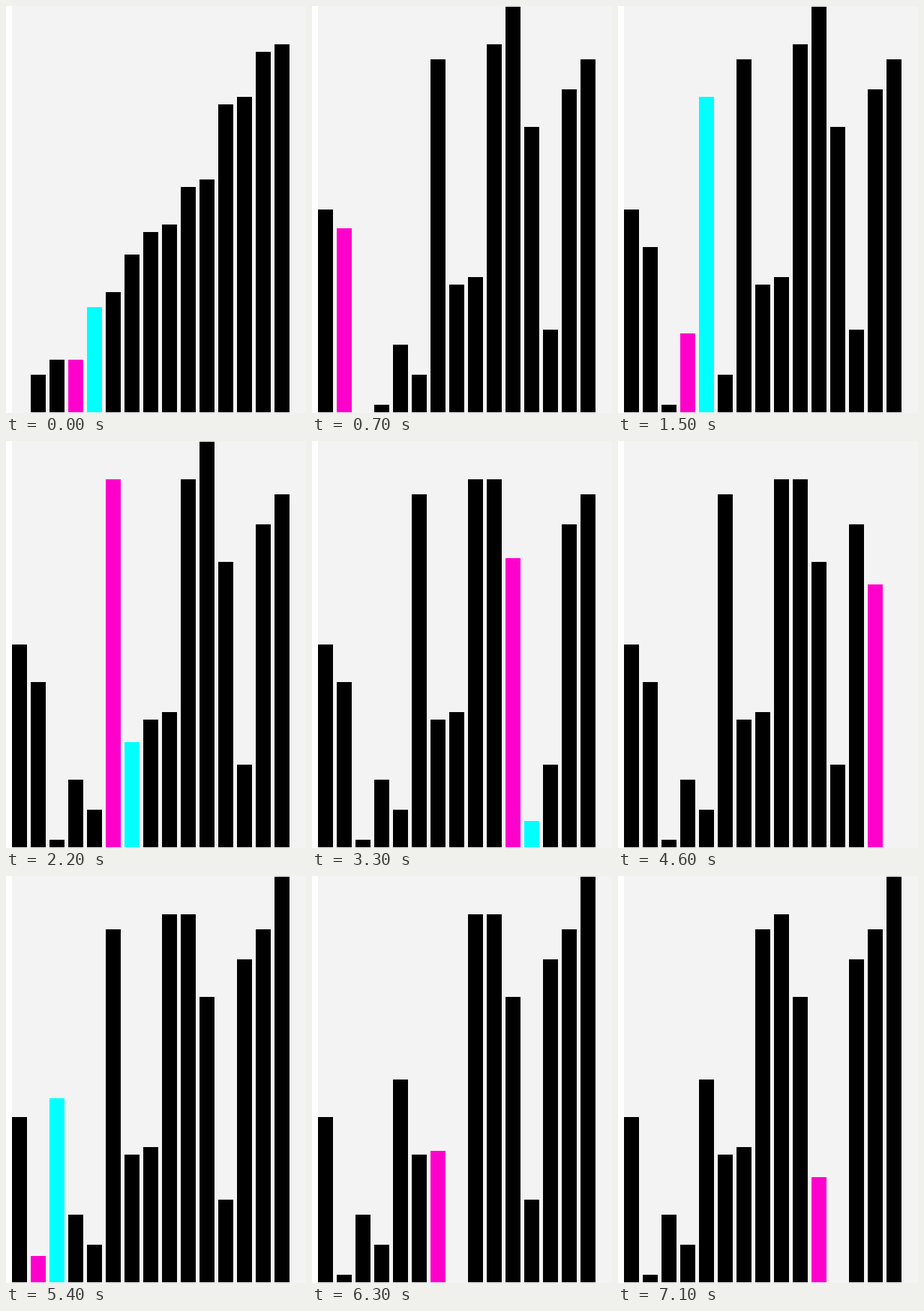
A matplotlib script for the animation above (7200 ms loop, 400 by 542 pixels).

```python
import numpy as np
import matplotlib.pyplot as plt
from matplotlib.animation import FuncAnimation
from matplotlib.patches import Rectangle

W, H, DPI = 400, 542, 64
FRAMES, STEP_MS = 72, 100
FLOOR, UNIT, RISE = 541, 10, 3.5
BLACK, LEFT, RIGHT = "#000000", "#ff00cc", "#00ffff"

SORTED = [0, 5, 7, 7, 14, 16, 21, 24, 25, 30, 31, 41, 42, 48, 49]
SHUFFLED = [27, 49, 22, 1, 9, 5, 47, 17, 18, 49, 54, 38, 11, 43, 47]
BLANK_AT, SORT_AT = 4, 6

# Sorting speed: about six ticks per frame, with slight drift
CLOCK = ([6, 15, 22, 33, 46, 54, 71], [2, 56, 96, 163, 242, 290, 391])


def bubble_sort(values):
    """Yield (heights, left index) per tick; swapped bars regrow one by one."""
    a = list(values)
    for end in range(len(a) - 1, 0, -1):
        for i in range(end):
            if a[i] <= a[i + 1]:
                continue
            a[i], a[i + 1] = a[i + 1], a[i]
            grown = [int(np.ceil(v / RISE)) for v in a[i:i + 2]]
            for k in range(grown[0] + 1):
                yield a[:i] + [k * RISE, 0] + a[i + 2:], i
            for k in range(grown[1] + 1):
                yield a[:i] + [grown[0] * RISE, k * RISE] + a[i + 2:], i


ticks = list(bubble_sort(SHUFFLED))

fig = plt.figure(figsize=(W / DPI, H / DPI), dpi=DPI, facecolor="white")
ax = fig.add_axes([0, 0, 1, 1])
ax.set(xlim=(0, W), ylim=(H, 0))
ax.axis("off")


def box(x, y, w, h, color):
    return ax.add_patch(Rectangle((x, y), w, h, facecolor=color,
                                  linewidth=0, antialiased=False))


box(8, 0, W - 8, H, "#f3f3f3")
bars = [box(8 + 25 * i, FLOOR, 20, 0, BLACK) for i in range(len(SHUFFLED))]


def state(n):
    if n < BLANK_AT:
        return SORTED, 3
    if n < SORT_AT:
        return [0] * len(bars), 0
    return ticks[int(round(np.interp(n, *CLOCK)))]


def draw(n):
    heights, left = state(n)
    colors = {left: LEFT, left + 1: RIGHT}
    for i, (bar, v) in enumerate(zip(bars, heights)):
        bar.set(y=FLOOR - v * UNIT, height=v * UNIT, visible=v > 0,
                facecolor=colors.get(i, BLACK))
    return bars


anim = FuncAnimation(fig, draw, frames=FRAMES, interval=STEP_MS,
                     repeat=True, repeat_delay=0)
plt.show()
```
